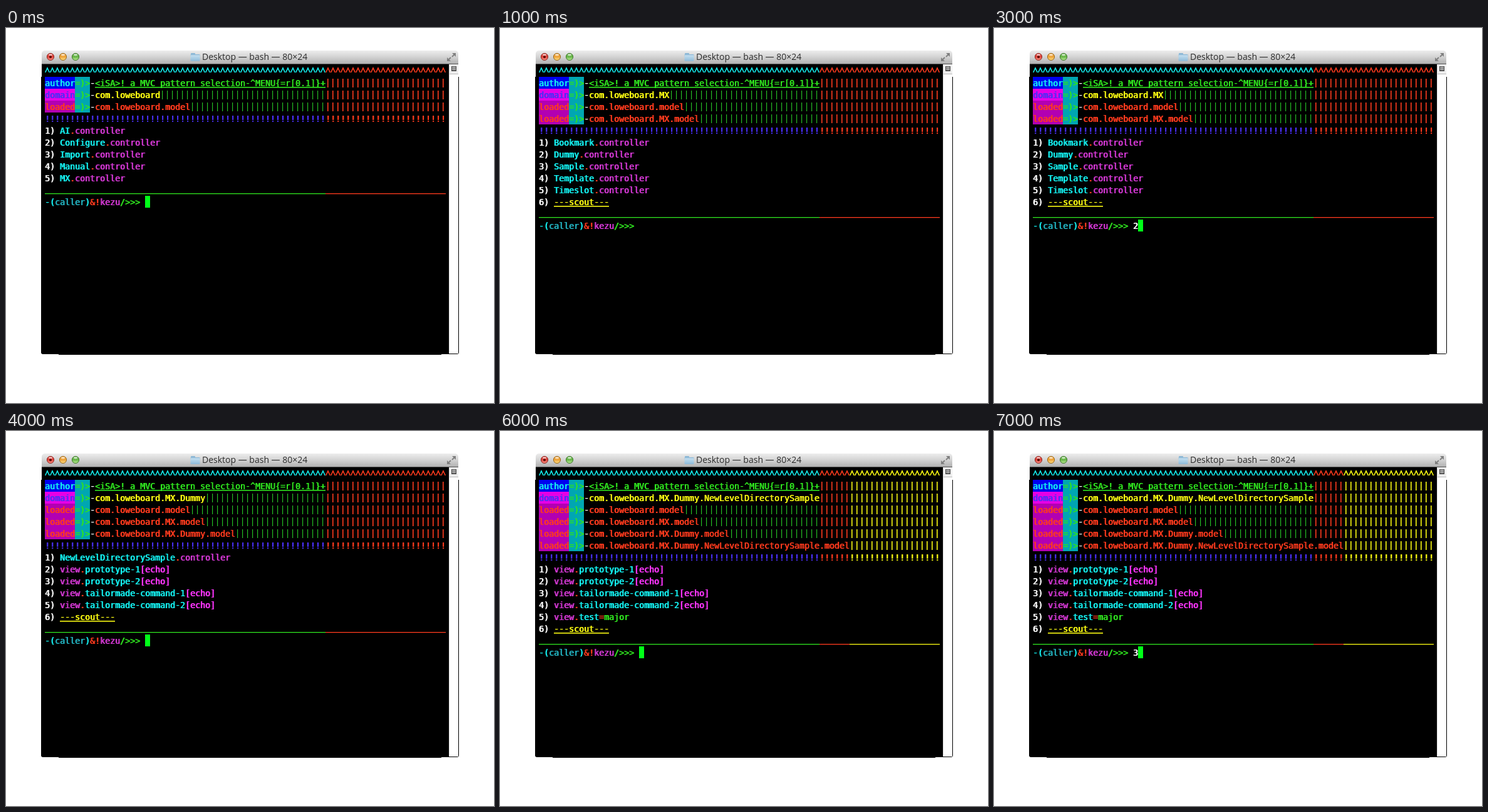
Write an HTML page with a canvas that moves like this. It is 779x599 px and loops after 8000 ms.

```html
<!DOCTYPE html>
<html lang="en">
<head>
<meta charset="utf-8">
<title>Terminal menu</title>
<style>
html, body { margin: 0; width: 100%; height: 100%; overflow: hidden; background: #fff; }
canvas { display: block; }
</style>
</head>
<body>
<canvas id="stage" width="779" height="599"></canvas>
<script>
const ctx = document.getElementById('stage').getContext('2d');

const LEFT = 62, TOP = 59, CELL = 8, ROW = 19, COLS = 80, MAIN = 56;
const MONO = '13.29px "DejaVu Sans Mono", monospace';
const C = {
  cyan: '#14f0f0', teal: '#22b0bd', tealBg: '#00a6b2', red: '#ff3b1e', yellow: '#fbfb12',
  green: '#2fe41f', dimGreen: '#25bc24', blue: '#4a30f5', magenta: '#d338d3',
  pink: '#ff35ff', white: '#fff', cursor: '#00ff18'
};

const parts = ['com.loweboard', 'MX', 'Dummy', 'NewLevelDirectorySample'];
const views = ['view.prototype-1[echo]', 'view.prototype-2[echo]',
  'view.tailormade-command-1[echo]', 'view.tailormade-command-2[echo]'];
const controllers = names => names.split(' ').map(n => n + '.controller');
const SCOUT = '---scout---';
const menus = [
  controllers('AI Configure Import Manual MX'),
  [...controllers('Bookmark Dummy Sample Template Timeslot'), SCOUT],
  [...controllers('NewLevelDirectorySample'), ...views, SCOUT],
  [...views, 'view.test=major', SCOUT]
];

// One step per second: menu depth, typed answer, cursor visibility
const STEP_MS = 1000;
const steps = [
  [1, '', true], [2, '', false], [2, '', true], [2, '2', true],
  [3, '', true], [3, '1', true], [4, '', true], [4, '3', true]
];

const colX = col => LEFT + col * CELL;
const rowY = row => row ? TOP + row * ROW : TOP - 1;

function rect(x, y, w, h, color) {
  ctx.fillStyle = color;
  ctx.fillRect(x, y, w, h);
}

function poly(points, color, width) {
  ctx.beginPath();
  points.forEach(([x, y]) => ctx.lineTo(x, y));
  if (width) {
    ctx.strokeStyle = color;
    ctx.lineWidth = width;
    ctx.stroke();
  } else {
    ctx.fillStyle = color;
    ctx.fill();
  }
}

function gradient(y0, y1, ...colors) {
  const g = ctx.createLinearGradient(0, y0, 0, y1);
  colors.forEach((c, i) => g.addColorStop(i / (colors.length - 1), c));
  return g;
}

// Prints double-struck text on the grid and returns the next free column
function print(text, col, row, color) {
  ctx.font = MONO;
  ctx.fillStyle = color;
  const x = colX(col), y = rowY(row) + 15;
  ctx.fillText(text, x - 0.2, y);
  ctx.fillText(text, x + 0.7, y);
  return col + text.length;
}

function printRuns(runs, col, row) {
  return runs.reduce((at, [text, color]) => print(text, at, row, color), col);
}

function underline(col, length, row, color) {
  rect(colX(col), rowY(row) + 16, length * CELL, 1.6, color);
}

// Splits a full-width row into its coloured column ranges
function bands(from, redEnd, first, draw) {
  [[0, MAIN, first], [MAIN, redEnd, C.red], [redEnd, COLS, C.yellow]].forEach(([a, b, color]) => {
    const start = Math.max(a, from);
    if (start < b) draw(start, b - start, color);
  });
}

function bars(from, row, redEnd) {
  bands(from, redEnd, C.dimGreen, (col, n, color) => {
    const width = color === C.dimGreen ? 1.2 : 1.6;
    for (let i = 0; i < n; i++) rect(colX(col + i) + 3, rowY(row) + 3, width, 14, color);
  });
}

function carets(redEnd) {
  bands(0, redEnd, C.cyan, (col, n, color) => {
    for (let i = 0; i < n; i++) {
      const x = colX(col + i);
      poly([[x + 0.7, 71], [x + 4, 64], [x + 7.3, 71]], color, 1.6);
    }
  });
}

function header(label, row, bg, labelColor, text, color, redEnd) {
  rect(LEFT, rowY(row), 6 * CELL, ROW, bg);
  rect(colX(6), rowY(row), 3 * CELL, ROW, C.tealBg);
  const end = printRuns([[label, labelColor], ['=)>', C.green], ['-', C.white], [text, color]], 0, row);
  bars(end, row, redEnd);
}

function itemRuns(item) {
  if (item === SCOUT) return [[item, C.yellow]];
  const [head, tail] = item.split('.');
  if (tail === 'controller') return [[head, C.cyan], ['.', C.red], [tail, C.magenta]];
  const [, name, echo, value] = tail.match(/^([\w-]+)(\[echo\])?(?:=(\w+))?$/);
  const runs = [[head, C.magenta], ['.', C.red], [name, C.cyan]];
  if (echo) runs.push([echo, C.pink]);
  if (value) runs.push(['=', C.red], [value, C.green]);
  return runs;
}

function drawScreen([depth, typed, cursor]) {
  const redEnd = depth === 4 ? 62 : COLS;
  const title = '<iSA>! a MVC pattern selection-^MENU{=r[0.1]}+';
  const pathTo = n => parts.slice(0, n).join('.');

  carets(redEnd);
  header('author', 1, '#0000f0', C.cyan, title, C.green, redEnd);
  underline(10, title.length, 1, C.green);
  header('domain', 2, '#e600e6', C.blue, pathTo(depth), C.yellow, redEnd);
  let row = 3;
  for (let n = 1; n <= depth; n++) {
    header('loaded', row++, '#b200b2', C.red, pathTo(n) + '.model', C.red, redEnd);
  }
  bands(0, redEnd, C.blue, (col, n, color) => print('!'.repeat(n), col, row, color));
  row++;

  menus[depth - 1].forEach((item, i) => {
    print(`${i + 1})`, 0, row, C.white);
    printRuns(itemRuns(item), 3, row);
    if (item === SCOUT) underline(3, item.length, row, C.yellow);
    row++;
  });

  bands(0, redEnd, C.green, (col, n, color) =>
    rect(colX(col), rowY(row) + 15, n * CELL, 1.3, color));
  row++;

  const end = printRuns([['-(', C.cyan], ['caller', C.teal], [')', C.cyan], ['&!', C.red],
    ['kezu', C.magenta], ['/>>> ', C.green], [typed, C.white]], 0, row);
  if (cursor) rect(colX(end), rowY(row), CELL, ROW, C.cursor);
}

function light(x, rim, base, glow) {
  ctx.beginPath();
  ctx.arc(x, 46, 5.6, 0, 7);
  ctx.fillStyle = gradient(40, 52, base, base, glow);
  ctx.fill();
  ctx.strokeStyle = rim;
  ctx.lineWidth = 1;
  ctx.stroke();
  ctx.beginPath();
  ctx.ellipse(x, 42.8, 3, 1.6, 0, 0, 7);
  ctx.fillStyle = 'rgba(255,255,255,.65)';
  ctx.fill();
}

function drawWindow() {
  rect(0, 0, 779, 599, '#fff');

  ctx.beginPath();
  ctx.roundRect(57, 36, 665, 24, [5, 5, 0, 0]);
  ctx.fillStyle = gradient(36, 57, '#ededed', '#d2d2d2', '#b2b2b2');
  ctx.fill();
  rect(57, 57, 665, 1, '#555');

  light(71, '#8e2a24', '#e0443c', '#ff9a8c');
  ctx.beginPath();
  ctx.arc(71, 46.3, 2, 0, 7);
  ctx.fillStyle = '#5c0c08';
  ctx.fill();
  light(91, '#9a6a1e', '#eda33a', '#ffe58a');
  light(111, '#3f7a2c', '#67b548', '#c4f29a');

  ctx.beginPath();
  ctx.roundRect(295, 40, 7, 5, 1);
  ctx.roundRect(294.5, 42, 15, 11, 1);
  ctx.fillStyle = gradient(40, 53, '#86b3d3', '#b4d5ea', '#8db9d8');
  ctx.fill();
  rect(295, 44, 14, 1, '#d3e8f5');

  ctx.font = '14px "Open Sans", "Noto Sans", sans-serif';
  ctx.fillStyle = '#2b2b2b';
  ctx.fillText('Desktop — bash — 80×24', 313, 51);

  const grey = '#808080';
  poly([[712, 40], [718, 40], [718, 46]], grey);
  poly([[712, 46], [716, 42]], grey, 2);
  poly([[704, 47], [704, 53], [710, 53]], grey);
  poly([[706, 51], [710, 47]], grey, 2);

  rect(57, 58, 650, 21, '#000');
  ctx.beginPath();
  ctx.roundRect(56, 78, 667, 443, [0, 0, 3, 3]);
  ctx.fillStyle = '#000';
  ctx.fill();
  rect(84, 521, 611, 1, '#000');

  rect(707, 58, 15, 462, '#fff');
  rect(707, 58, 1, 462, '#ddd');
  rect(708, 58, 14, 15, '#eee');
  rect(708, 73, 14, 1, '#bbb');
  rect(711, 61, 8, 8, '#444');
  rect(712, 62, 6, 6, '#ddd');
  [63, 65, 67].forEach(y => rect(712, y, 6, 1, '#555'));
}

function frame(now) {
  drawWindow();
  drawScreen(steps[Math.floor(now / STEP_MS) % steps.length]);
}

let start;
function tick(now) {
  start ??= now;
  frame(now - start);
  requestAnimationFrame(tick);
}
frame(0);
requestAnimationFrame(tick);
</script>
</body>
</html>
```
